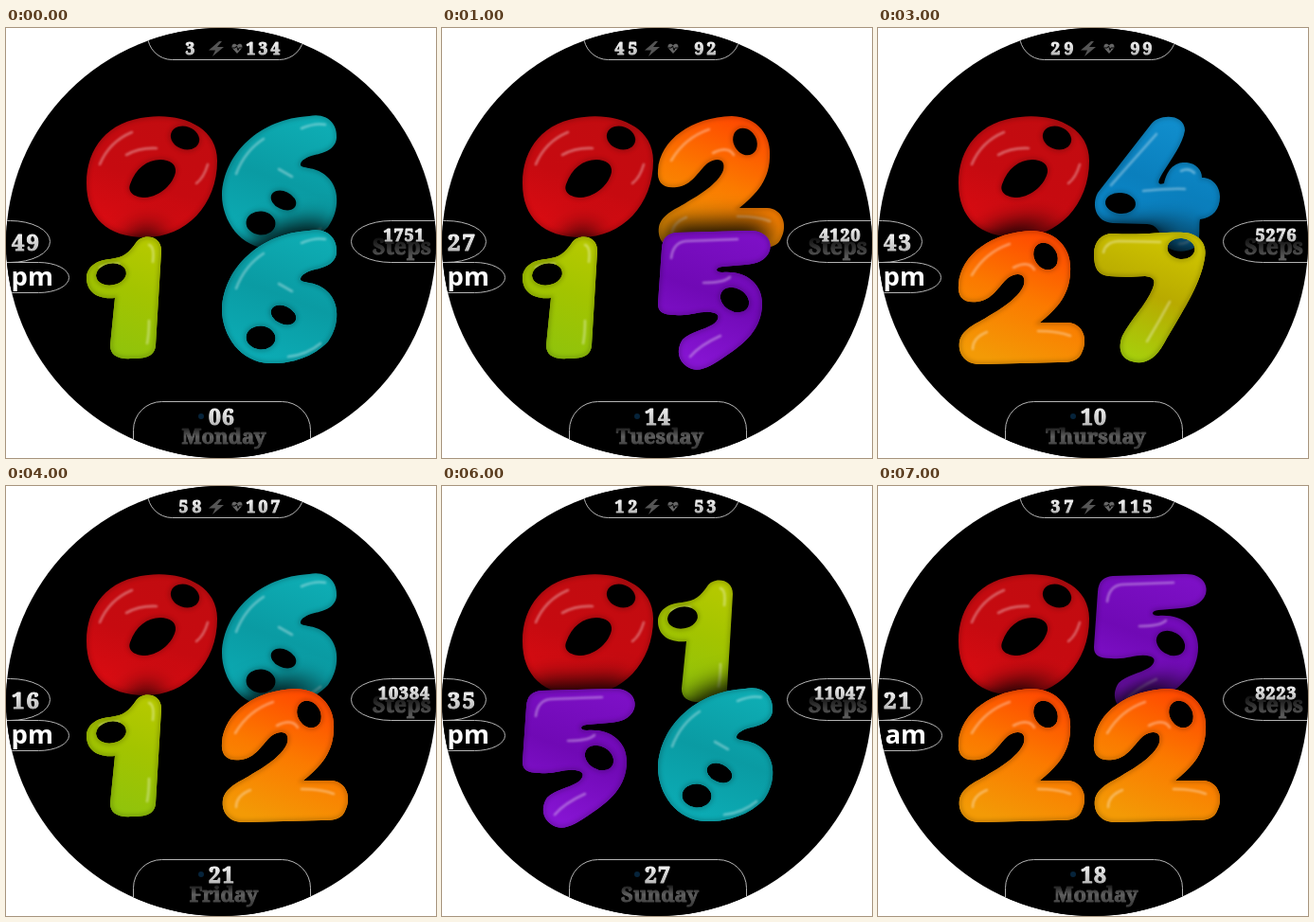
Write an HTML page with a canvas that moves like this. It is 454x454 px and loops after 8000 ms.

```html
<!DOCTYPE html>
<html lang="en">
<head>
<meta charset="utf-8">
<title>Balloon watch face</title>
<style>
  html, body { margin: 0; width: 100%; height: 100%; overflow: hidden; background: #fff; }
  canvas { display: block; }
</style>
</head>
<body>
<canvas id="face" width="454" height="454"></canvas>
<script>
const ctx = document.getElementById('face').getContext('2d');

// outline, holes [x, y, rx, ry, degrees], colours from top to bottom, highlights
const shapes = {
  0: {
    d: 'M65 2C100-2 138 12 138 48C138 95 105 129 62 129C22 129 0 108 0 72C0 35 22 6 65 2Z' +
       'M46 73C52 56 64 47 78 47C88 47 95 52 94 60C92 72 78 86 62 87C50 87 43 81 46 73Z',
    holes: [[104, 24, 15.5, 12, 20]], colors: ['#c20c10', '#c60a10', '#de0c12'],
    shine: 'M14 52Q24 28 48 18M42 42Q56 34 74 35M116 72Q124 66 128 52'
  },
  1: {
    d: 'M25 31C40 29 45 24 52 14C58 4 79 5 79 22L73 122C72 134 62 136 48 136C32 137 25 132 25 122L30 72C10 74 0 64 0 51C0 40 10 32 25 31Z',
    holes: [[26, 47, 16, 11.5, -10]], colors: ['#bccb00', '#a3c400', '#8fc30c'],
    shine: 'M66 16Q72 18 70 34M14 40Q22 36 34 36M64 120Q66 110 66 96'
  },
  2: {
    d: 'M0 58C2 26 36 2 78 1C106 2 120 22 118 45C117 72 100 86 86 98L115 98C132 99 137 116 130 130C126 140 115 140 105 140L25 142C8 143-1 132 1 118C4 104 20 99 32 91C48 82 65 70 69 58C72 46 62 44 52 51C42 60 36 74 20 76C4 78-1 70 0 58Z',
    holes: [[92, 28, 12, 15, -30]], colors: ['#ff4800', '#fb7a00', '#f39a06'],
    shine: 'M14 48Q28 24 54 15M15 126Q15 114 30 108M58 40Q74 32 80 42M84 107Q105 107 118 112'
  },
  4: {
    d: 'M60 10C68-2 96-2 96 16C94 30 82 46 72 62C66 72 68 74 74 72C78 54 88 49 98 50C108 51 114 58 114 66C126 66 133 76 133 86C133 99 126 108 112 110C110 118 114 134 106 140C94 147 76 144 72 132C70 124 66 115 56 115L20 114C2 113-3 95 4 82Z',
    holes: [[28, 93, 16, 11, 5]], colors: ['#118fce', '#0a7fbd', '#0b8bd0'],
    shine: 'M18 74L66 20M52 80Q84 77 96 78M90 136Q100 136 104 128M92 59Q100 55 106 61'
  },
  5: {
    d: 'M20 3L95 1C114 0 121 12 118 22C114 33 104 36 92 37L68 39C60 40 60 45 68 45C92 43 110 56 110 78C110 104 92 120 72 133C58 143 46 150 36 147C22 142 18 128 26 116C34 108 48 106 58 100C64 96 66 90 60 88C46 84 36 92 18 90C4 90 0 86 0 78L4 20C5 8 10 4 20 3Z',
    holes: [[81, 74, 16, 12, 30]], colors: ['#7d10c6', '#7009b5', '#8614d2'],
    shine: 'M14 30Q16 13 30 12L84 10M34 134Q44 122 66 112M48 56Q70 56 76 50'
  },
  6: {
    d: 'M92 1C112-3 122 10 121 24C120 36 108 40 98 42C90 44 82 48 83 53C86 57 100 54 111 65C124 76 125 100 112 118C95 136 70 142 50 141C20 140 0 112 0 84C2 40 40 4 92 1Z',
    holes: [[41, 114, 15.5, 12.5, 5], [65, 90, 14, 9.5, 25]], colors: ['#0eadb4', '#0a9ba3', '#0cacb5'],
    shine: 'M15 62Q24 38 44 25M84 14Q98 8 109 10M60 57L74 65M70 134Q90 132 104 120'
  },
  7: {
    d: 'M20 4C50 6 75 2 95 3C112 4 120 16 117 30C112 60 92 88 74 120C64 138 52 143 40 139C26 135 26 122 30 112C38 96 56 78 62 62C66 52 62 50 54 49C40 50 28 50 16 49C4 48 0 40 0 26C0 12 8 4 20 4Z',
    holes: [[92, 20, 14.5, 11, 5]], colors: ['#d2c800', '#b8aa00', '#a6d00c'],
    shine: 'M10 24Q12 13 26 12L70 13M56 118Q68 98 80 76'
  }
};
for (const s of Object.values(shapes)) {
  s.path = new Path2D(s.d);
  for (const [x, y, rx, ry, deg] of s.holes) {
    const hole = new Path2D();
    hole.ellipse(x, y, rx, ry, deg * Math.PI / 180, 0, 7);
    s.path.addPath(hole);
  }
  s.glow = new Path2D(s.shine);
}

// one state per second
const states = [
  { time: '0616', sec: '49', half: 'pm', battery: '3',  pulse: '134', steps: '1751',  date: '06', day: 'Monday' },
  { time: '0215', sec: '27', half: 'pm', battery: '45', pulse: '92',  steps: '4120',  date: '14', day: 'Tuesday' },
  { time: '1006', sec: '03', half: 'am', battery: '11', pulse: '84',  steps: '3569',  date: '12', day: 'Wednesday' },
  { time: '0427', sec: '43', half: 'pm', battery: '29', pulse: '99',  steps: '5276',  date: '10', day: 'Thursday' },
  { time: '0612', sec: '16', half: 'pm', battery: '58', pulse: '107', steps: '10384', date: '21', day: 'Friday' },
  { time: '0241', sec: '49', half: 'pm', battery: '76', pulse: '149', steps: '1802',  date: '07', day: 'Saturday' },
  { time: '0156', sec: '35', half: 'pm', battery: '12', pulse: '53',  steps: '11047', date: '27', day: 'Sunday' },
  { time: '0522', sec: '21', half: 'am', battery: '37', pulse: '115', steps: '8223',  date: '18', day: 'Monday' }
];

function gradient(x0, y0, x1, y1, colors) {
  const g = ctx.createLinearGradient(x0, y0, x1, y1);
  colors.forEach((c, i) => g.addColorStop(i / (colors.length - 1), c));
  return g;
}

function balloon(digit, x, y, shadow) {
  const s = shapes[digit];
  ctx.save();
  ctx.translate(x, y);
  ctx.fillStyle = gradient(95, 5, 45, 140, s.colors);
  if (shadow) {
    ctx.shadowColor = '#000';
    ctx.shadowBlur = 26;
    ctx.shadowOffsetY = -9;
  }
  ctx.fill(s.path, 'evenodd');
  if (!shadow) {
    ctx.clip(s.path, 'evenodd');
    ctx.lineCap = 'round';
    ctx.filter = 'blur(2px)';
    ctx.strokeStyle = 'rgba(0,0,0,.2)';
    ctx.lineWidth = 4;
    ctx.stroke(s.path);
    ctx.filter = 'blur(1px)';
    ctx.strokeStyle = 'rgba(255,255,255,.36)';
    ctx.lineWidth = 2.6;
    ctx.stroke(s.glow);
  }
  ctx.restore();
}

// heavy serif text, thickened by a thin stroke
function serif(text, x, y, size, fill) {
  ctx.font = `900 ${size}px "Noto Serif", serif`;
  ctx.textAlign = 'center';
  ctx.fillStyle = ctx.strokeStyle = fill;
  ctx.lineWidth = 1;
  ctx.lineJoin = 'round';
  ctx.fillText(text, x, y);
  ctx.strokeText(text, x, y);
}

// digits in equal cells around a centre
function cells(text, cx, y, size, step) {
  const fill = gradient(0, y - size * .7, 0, y, ['#f0f0f0', '#bcbcbc']);
  [...text].forEach((c, i) => serif(c, cx + (i - (text.length - 1) / 2) * step, y, size, fill));
}

function pill(x, y, w, h, radii) {
  ctx.beginPath();
  ctx.roundRect(x + .5, y + .5, w, h, radii);
  ctx.fillStyle = '#000';
  ctx.fill();
  ctx.strokeStyle = '#b4b4b4';
  ctx.lineWidth = 1;
  ctx.stroke();
}

function icons() {
  ctx.fillStyle = '#555';
  ctx.fill(new Path2D('M225 14L214 23.5L221 23.5L218 30L230 20L223 20L228 14Z'));
  ctx.fillStyle = '#666';
  ctx.fill(new Path2D('M244 27L239 21.5C237 17 242 15 244 18.5C246 15 251 17 249 21.5Z'));
  ctx.strokeStyle = '#000';
  ctx.stroke(new Path2D('M239 21L242 21L243.5 19L245 23.5L246 21L249 21'));
  ctx.fillStyle = '#06233a';
  ctx.beginPath();
  ctx.arc(206, 410, 3, 0, 7);
  ctx.fill();
}

function draw(s) {
  ctx.fillStyle = '#fff';
  ctx.fillRect(0, 0, 454, 454);
  ctx.save();
  ctx.beginPath();
  ctx.arc(227, 227, 227, 0, 7);
  ctx.fillStyle = '#000';
  ctx.fill();
  ctx.clip();

  const [a, b, c, d] = s.time;
  balloon(a, 85, 92);
  balloon(b, 228, 92);
  for (const shadow of [true, false]) {
    balloon(c, 85, 213, shadow);
    balloon(d, 228, 213, shadow);
  }

  const am = s.half === 'am';
  const oval = { x: 42, y: 22 }, wide = { x: 32, y: 16 };
  pill(149, -10, 165, 43, [0, 0, 26, 26]);
  pill(134, 394, 187, 70, [30, 30, 0, 0]);
  pill(-30, 203, 76, 44, [0, oval, oval, 0]);
  pill(-30, 247, am ? 97 : 96, 32, [0, wide, wide, 0]);
  pill(364, 203, 130, 44, [oval, 0, 0, oval]);
  icons();

  cells(s.battery, 194.5, 28, 17.5, 14);
  cells(s.pulse, 284.5 - (s.pulse.length - 1) * 6.5, 28, 17.5, 13);
  cells(s.sec, 20.5, 235, 24, 15.5);
  ctx.font = '700 27.5px "Noto Sans", sans-serif';
  ctx.textAlign = 'left';
  ctx.fillStyle = '#fff';
  ctx.fillText(s.half, am ? 7.5 : 5.5, 271.5);
  serif('Steps', 418, 239, 23, gradient(0, 222, 0, 242, ['#101010', '#333', '#5a5a5a']));
  cells(s.steps, 420, 225, 18, 11);
  serif(s.day, 230, 438.5, 22, gradient(0, 421, 0, 442, ['#161616', '#606060', '#3c3c3c']));
  cells(s.date, 227.5, 418.5, 23, 14);
  ctx.restore();
}

let shown = -1;
function tick() {
  const index = Math.floor(performance.now() / 1000) % states.length;
  if (index !== shown) draw(states[shown = index]);
  requestAnimationFrame(tick);
}
tick();
</script>
</body>
</html>
```
